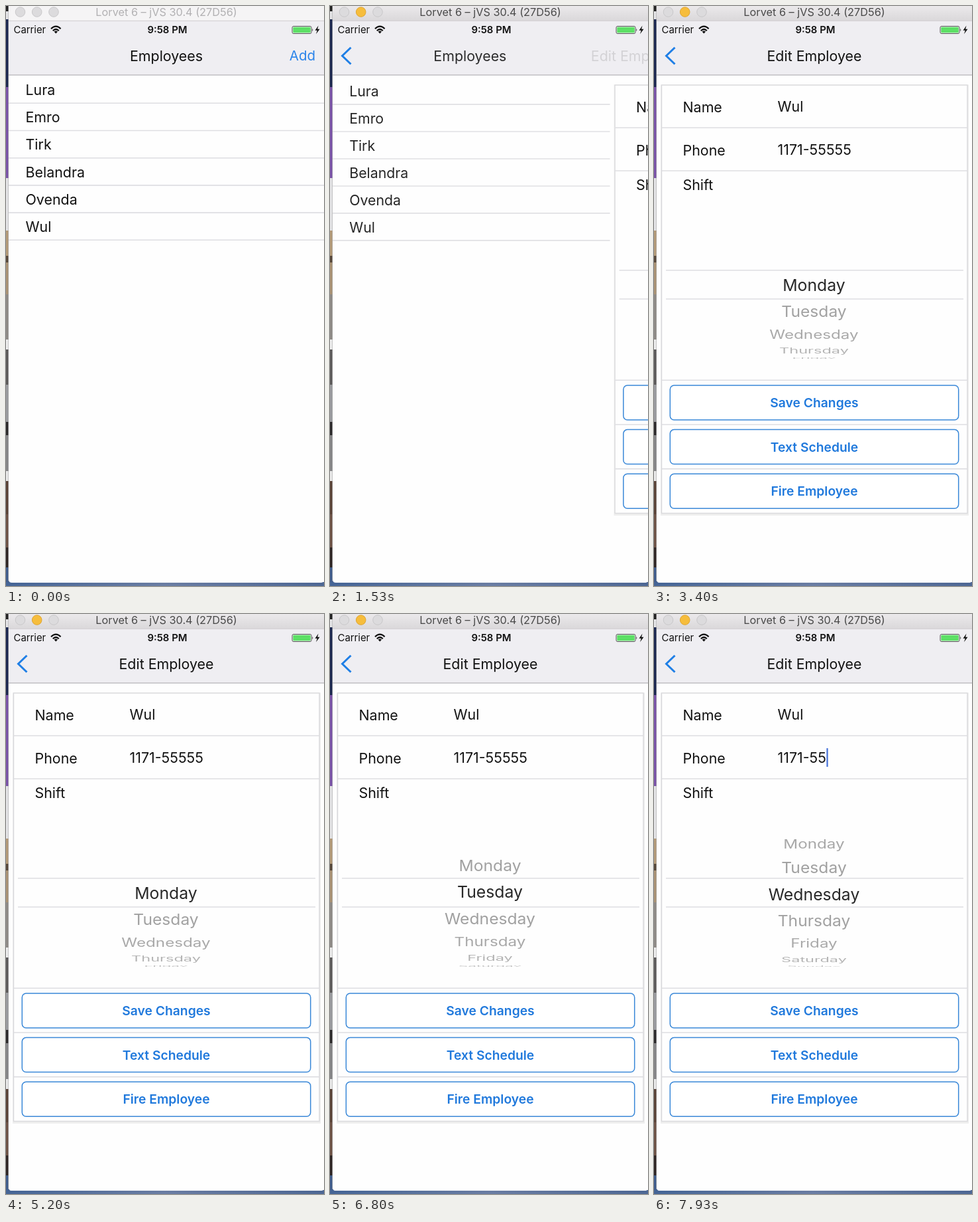
Write an HTML page that moves like this. It is 480 px wide and 873 px high and loops after 8 s.

```html
<!DOCTYPE html>
<html lang="en">
<head>
<meta charset="utf-8">
<title>Employee list</title>
<style>
  html, body { margin: 0; width: 100%; height: 100%; overflow: hidden; background: #fff; }
  svg { display: block; width: 480px; height: 873px; }
  text { font: 21.4px Inter, "Liberation Sans", sans-serif; fill: #111; white-space: pre; }
  .mid { text-anchor: middle; }
  .line { stroke: #dedee2; stroke-width: 1.6; }
  .button rect { fill: #fff; stroke: #3a88d8; stroke-width: 1.5; }
  .button text { font-size: 19.3px; font-weight: 600; fill: #2079dc; }
  .wheel text { font-size: 24.8px; }
  .status { font-size: 14.9px; }
</style>
</head>
<body>
<svg viewBox="0 0 480 873">
  <defs>
    <linearGradient id="activeBar" x2="0" y2="1">
      <stop stop-color="#ebe9eb"/><stop offset="1" stop-color="#dad8da"/>
    </linearGradient>
    <linearGradient id="dock">
      <stop stop-color="#456596"/><stop offset=".5" stop-color="#6a7da3"/><stop offset="1" stop-color="#4d6794"/>
    </linearGradient>
    <clipPath id="window"><path d="M4 0H480V863q0 5-5 5H9q-5 0-5-5Z"/></clipPath>
    <clipPath id="band"><rect y="398" width="480" height="43"/></clipPath>
    <clipPath id="outside"><path d="M0 305H480V398H0ZM0 441H480V531H0Z"/></clipPath>
  </defs>

  <g id="desktop"></g>
  <rect y="867" width="480" height="6" fill="url(#dock)"/>
  <path d="M3.5 0V866" stroke="#aaa" stroke-opacity=".6"/>

  <g clip-path="url(#window)">
    <rect x="4" width="476" height="869" fill="#fefefe"/>
    <g id="listPage"></g>

    <g id="editPage">
      <rect x="4" y="104" width="476" height="765" fill="#fefefe"/>
      <rect x="11.5" y="120" width="462" height="645.5" fill="none" stroke="#eee" stroke-width="3"/>
      <rect x="11.5" y="119" width="461.5" height="644.5" fill="#fefefe" stroke="#d9d9dc" stroke-width="1.4"/>
      <g id="dividers"></g>
      <text x="43.5" y="160">Name</text>
      <text x="186.5" y="159">Wul</text>
      <text x="43.5" y="225">Phone</text>
      <text id="phone" x="186.5" y="223.5"></text>
      <rect id="caret" y="202" width="2.2" height="28" fill="#4470d8"/>
      <text x="43.5" y="277">Shift</text>
      <g clip-path="url(#outside)"><g class="wheel" opacity=".4"></g></g>
      <g clip-path="url(#band)"><g class="wheel" opacity=".9"></g></g>
      <path class="line" d="M18 397.8H467M18 441H467"/>
      <g id="buttons"></g>
    </g>

    <rect x="4" y="22" width="476" height="81.5" fill="#efeef2"/>
    <path d="M4 103.8H480" stroke="#b4b3b7" stroke-width="1.3"/>
    <text class="mid" id="listTitle" x="242" y="83">Employees</text>
    <text class="mid" id="editTitle" x="242" y="83">Edit Employee</text>
    <text id="add" x="467" y="82" text-anchor="end" style="font-size:20.5px;fill:#2b84ea">Add</text>
    <path id="back" d="M31.5 62.5L18.5 75L31.5 87.5" fill="none" stroke="#1f7fe6" stroke-width="3"/>

    <text class="status" x="11.5" y="41">Carrier</text>
    <g fill="none" stroke="#111" stroke-width="2.2">
      <path d="M68 34.2Q75.3 27.2 82.6 34.2M70.8 37.2Q75.3 32.8 79.8 37.2"/>
    </g>
    <path d="M72.6 38.6Q75.3 36.3 78 38.6L75.3 41.4Z" fill="#111"/>
    <text class="status mid" x="243.5" y="41" style="font-weight:600">9:58 PM</text>
    <rect x="432" y="30.5" width="29" height="11" rx="2" fill="#efeef2" stroke="#555"/>
    <rect x="433.3" y="31.8" width="26.4" height="8.4" rx="1" fill="#5de066"/>
    <path d="M462.3 34Q464.3 36 462.3 38.2Z" fill="#444"/>
    <path d="M471.5 29.5L466.5 36.8H469.7L468 42.3L473.5 34.8H470.2Z" fill="#111"/>

    <rect id="bar" x="4" width="476" height="22"/>
    <path d="M4 22.3H480" stroke="#cfcdd0"/>
    <g stroke="#c9c8ca" fill="#dcdbdd">
      <circle cx="21.5" cy="9" r="7.3"/>
      <circle id="minimise" cx="46.7" cy="9" r="7.3"/>
      <circle cx="72" cy="9" r="7.3"/>
    </g>
    <text class="mid" id="barTitle" x="242" y="15" style="font-size:16.3px">Lorvet 6 – jVS 30.4 (27D56)</text>
  </g>
</svg>

<script>
const LOOP = 8000, FOCUS = 1270, SLIDE = 1466, SLIDE_TIME = 300, CARET = 7200;
const PHONE = '1171-55555';
const people = ['Lura', 'Emro', 'Tirk', 'Belandra', 'Ovenda', 'Wul'];
const days = ['Monday', 'Tuesday', 'Wednesday', 'Thursday', 'Friday', 'Saturday', 'Sunday'];
const buttons = ['Save Changes', 'Text Schedule', 'Fire Employee'];
const scrollKeys = [[5680, 0], [5850, .08], [6200, .454], [7330, 1.54], [7600, 1.77], [7930, 1.95], [8000, 1.97]];
const desktopBands = [
  [0, '#222'], [8, '#e4e4e6'], [20, '#1c2850'], [122, '#7a53a8'], [259, '#e3e3e5'], [338, '#b39a78'],
  [376, '#57483a'], [386, '#a99274'], [434, '#8e8a86'], [502, '#ececec'], [517, '#5c5a5a'], [570, '#9a9b9f'],
  [626, '#2c2a2b'], [646, '#858587'], [700, '#e8e8e8'], [715, '#5a4337'], [765, '#6d5245'], [815, '#2e2524'], [845, '#3f5c8c']
];

const $ = id => document.getElementById(id);
const clamp = (v, lo = 0, hi = 1) => v < lo ? lo : v > hi ? hi : v;
const show = (el, on) => el.setAttribute('visibility', on ? 'visible' : 'hidden');

$('desktop').innerHTML = desktopBands.map(([y, color], i) =>
  `<rect y="${y}" width="5" height="${(desktopBands[i + 1]?.[0] ?? 873) - y}" fill="${color}"/>`).join('');
$('listPage').innerHTML = people.map((name, i) =>
  `<text x="29.5" y="${134 + 41.2 * i}">${name}</text>
   <path class="line" d="M4 ${146.3 + 41.2 * i}H480"/>`).join('');
$('dividers').innerHTML = [183.2, 248, 563.3, 630, 696.6].map(y =>
  `<path class="line" d="M12 ${y}H473"/>`).join('');
$('buttons').innerHTML = buttons.map((label, i) =>
  `<g class="button" transform="translate(0 ${66.6 * i})">
     <rect x="24.3" y="571" width="435.4" height="52" rx="6"/>
     <text class="mid" x="242" y="604">${label}</text></g>`).join('');
const wheels = [...document.querySelectorAll('.wheel')];
for (const wheel of wheels) wheel.innerHTML = days.map(day => `<text class="mid" y="9">${day}</text>`).join('');

function easeInOut(u) {
  return u < .5 ? (2 * u) ** 1.7 / 2 : 1 - (2 - 2 * u) ** 1.7 / 2;
}

function scrollAt(t) {
  const i = scrollKeys.findIndex(key => key[0] > t);
  if (i <= 0) return i ? scrollKeys.at(-1)[1] : 0;
  const [t0, a] = scrollKeys[i - 1], [t1, b] = scrollKeys[i];
  return a + (b - a) * (t - t0) / (t1 - t0);
}

function drawWheel(offset) {
  days.forEach((_, i) => {
    const angle = (i - offset) * .37, depth = Math.cos(angle);
    const y = 419.7 + 110.6 * Math.sin(angle), scaleX = 1 - .09 * (1 - depth);
    for (const wheel of wheels) {
      const label = wheel.children[i];
      label.setAttribute('display', Math.abs(angle) < 1.55 ? 'inline' : 'none');
      label.setAttribute('transform', `translate(241.5 ${y}) scale(${scaleX} ${depth})`);
      label.setAttribute('opacity', .6 + .4 * clamp(depth));
    }
  });
}

function draw(t) {
  const active = t >= FOCUS, sliding = t >= SLIDE;
  $('bar').setAttribute('fill', active ? 'url(#activeBar)' : '#f5f4f5');
  $('barTitle').style.fill = active ? '#4a4a4a' : '#b2b1b3';
  $('minimise').setAttribute('fill', active ? '#f6bd3c' : '#dcdbdd');
  $('minimise').setAttribute('stroke', active ? '#dfa532' : '#c9c8ca');

  const p = easeInOut(clamp((t - SLIDE) / SLIDE_TIME));
  $('listPage').setAttribute('transform',
    `translate(${242 - 12.7 * p} 445) scale(${1 - .05 * p}) translate(-242 -445)`);
  $('listPage').setAttribute('opacity', 1 - .7 * p);
  $('editPage').setAttribute('transform', `translate(${476 * (1 - p)} 0)`);
  $('editPage').setAttribute('display', sliding ? 'inline' : 'none');
  $('listTitle').setAttribute('transform', `translate(${-254 * p} 0)`);
  $('listTitle').setAttribute('opacity', 1 - p);
  $('editTitle').setAttribute('transform', `translate(${254 * (1 - p)} 0)`);
  $('editTitle').setAttribute('opacity', p);
  show($('add'), !sliding);
  show($('back'), sliding);

  drawWheel(scrollAt(t));
  const deleted = clamp(Math.ceil((t - 7500) / 150), 0, 3);
  $('phone').textContent = PHONE.slice(0, PHONE.length - deleted);
  if (sliding) $('caret').setAttribute('x', 187 + $('phone').getComputedTextLength());
  show($('caret'), t >= CARET);
}

function tick() {
  draw(performance.now() % LOOP);
  requestAnimationFrame(tick);
}
tick();
</script>
</body>
</html>
```
